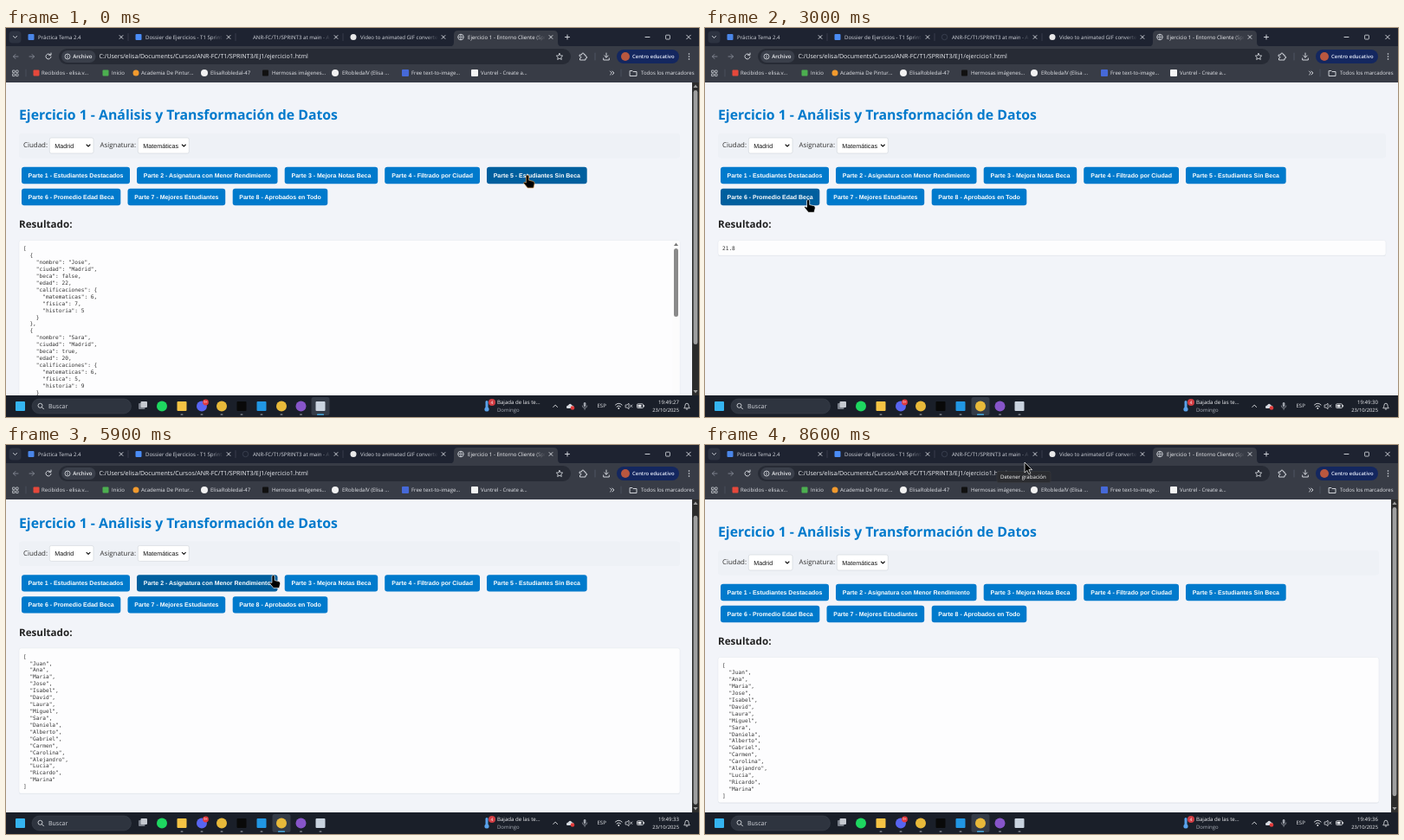
Write an HTML page that moves like this. It is 800 px wide and 450 px high and loops after 8.7 s.

```html
<!DOCTYPE html>
<html lang="es">
<head>
<meta charset="utf-8">
<title>Ejercicio 1</title>
<style>
html, body { margin: 0; width: 100%; height: 100%; overflow: hidden; background: #f2f4f9; }
svg { display: block; width: 100vw; height: 100vh; }
text { font-family: "Open Sans", "Noto Sans", sans-serif; text-rendering: geometricPrecision; white-space: pre; }
.ui { font-family: "Liberation Sans", Arial, sans-serif; }
.code { font-family: "DejaVu Sans Mono", monospace; }
.line { fill: none; stroke-linecap: round; stroke-linejoin: round; }
</style>
</head>
<body>
<svg viewBox="0 0 800 450" preserveAspectRatio="none">
  <defs>
    <clipPath id="view"><rect y="63" width="800" height="362"/></clipPath>
    <linearGradient id="fade"><stop offset="0" stop-color="#1e2331" stop-opacity="0"/><stop offset=".6" stop-color="#1e2331"/></linearGradient>
    <linearGradient id="fadeActive"><stop offset="0" stop-color="#383c46" stop-opacity="0"/><stop offset=".6" stop-color="#383c46"/></linearGradient>
  </defs>
  <rect width="800" height="450" fill="#f2f4f9"/>
  <g clip-path="url(#view)">
    <g id="page"></g>
    <g id="pageBar"></g>
  </g>
  <g id="browser"></g>
  <g id="taskbar"></g>
  <g id="tooltip"></g>
  <path id="cursor" fill="#000" stroke-width=".7" stroke-linejoin="round"/>
</svg>
<script>
const LOOP = 8700, STEP = 100, TOP = 63, VIEW = 362;
const $ = id => document.getElementById(id);

const rect = (x, y, w, h, fill, rx = 0, more = '') =>
  `<rect x="${x}" y="${y}" width="${w}" height="${h}" rx="${rx}" fill="${fill}" ${more}/>`;
const dot = (x, y, r, fill) => `<circle cx="${x}" cy="${y}" r="${r}" fill="${fill}"/>`;
const ring = (x, y, r, color) => `<circle cx="${x}" cy="${y}" r="${r}" fill="none" stroke="${color}" stroke-width=".8"/>`;
const line = (d, color = '#dfe2e8', width = .9) => `<path class="line" d="${d}" stroke="${color}" stroke-width="${width}"/>`;
// y is the middle of the line of text
const text = (x, y, str, size, fill, more = '') =>
  `<text x="${x}" y="${y + size * .36}" font-size="${size}" fill="${fill}" xml:space="preserve" ${more}>${str}</text>`;
const bold = 'font-weight="700"';
const square = (x, y, size, fill, rx = 1) => rect(x - size / 2, y - size / 2, size, size, fill, rx);

// Page data
const student = (nombre, ciudad, beca, edad, notas, promedio) => {
  const [matematicas, fisica, historia] = notas;
  return { nombre, ciudad, beca, edad, calificaciones: { matematicas, fisica, historia }, promedio };
};
const filtered = [
  student('Jose', 'Madrid', false, 22, [6, 7, 5]),
  student('Sara', 'Madrid', true, 20, [6, 5, 9]),
  student('Roberto', 'Madrid', false, 20, [7, 6, 8])
];
const best = [
  student('Carmen', 'Barcelona', true, 24, [9, 9, 9], 9),
  student('Alejandro', 'Bilbao', false, 23, [9, 8, 8], 8.333333333333334)
];
const passed = ('Juan Ana Maria Jose Isabel David Laura Miguel Sara Daniela Alberto Gabriel Carmen ' +
  'Carolina Alejandro Lucia Ricardo Marina').split(' ');
const noGrant = ['Juan (21 años)', 'Pedro (23 años)', 'Jose (22 años)', 'Roberto (20 años)'];

const views = [
  { at: 0, data: filtered, max: 219.5 },
  { at: 1200, data: 4, info: true },
  { at: 2400, data: 21.8 },
  { at: 3800, data: best },
  { at: 5700, data: passed }
].map(v => {
  const lines = JSON.stringify(v.data, null, 2).split('\n');
  const height = Math.min(v.max || 999, lines.length * 7.93 + 10);
  const total = 245.5 + height + 21.5 - TOP;
  return { ...v, lines, height, total, scrolls: total > VIEW };
});

const buttons = [
  [18, 161, 125, 'Parte 1 - Estudiantes Destacados'],
  [151, 161, 162.5, 'Parte 2 - Asignatura con Menor Rendimiento'],
  [321.7, 161, 107.5, 'Parte 3 - Mejora Notas Beca'],
  [437.2, 161, 109.8, 'Parte 4 - Filtrado por Ciudad'],
  [555, 161, 115.7, 'Parte 5 - Estudiantes Sin Beca'],
  [18, 186, 114.3, 'Parte 6 - Promedio Edad Beca'],
  [140.5, 186, 112.7, 'Parte 7 - Mejores Estudiantes'],
  [261.7, 186, 109.6, 'Parte 8 - Aprobados en Todo']
];
const inside = ([bx, by, w], x, y, pad = 0) =>
  x >= bx - pad && x <= bx + w + pad && y >= by - pad && y <= by + 19 + pad;

const select = (x, w, label) =>
  rect(x, 127, w, 18, '#fff', 2, 'stroke="#cfd3d8" stroke-width=".6"') +
  text(x + 6, 136, label, 7.2, '#111', 'class="ui"') +
  line(`M${x + w - 8} 135l2 2 2-2`, '#111', 1.1);

function result(v, right) {
  let out = rect(15, 246, right - 15, v.height, '#dfe4ea', 2.5) +
    rect(15, 245.5, right - 15, v.height - .3, '#fdfdfe', 2.5, 'stroke="#e3e7ec" stroke-width=".5"');
  v.lines.forEach((s, i) => out += text(20, 255 + i * 7.93, s, 6.16, '#333', 'class="code"'));
  if (v.max) out += rect(769.5, 246, 8, v.height - 1, '#fcfcfc') +
    rect(771, 255, 5, 79, '#8a8a8a', 2.5) + '<path d="M771 252l2.5-3.5 2.5 3.5z" fill="#777"/>';
  if (v.info) {
    out += rect(15, 275, right - 15, 95, '#007acc', 2.5) + rect(17, 275, right - 17, 95, '#eaf1fe', 2) +
      text(22, 296, 'Estudiantes sin beca en Madrid (4):', 9.24, '#222', bold);
    noGrant.forEach((s, i) => out += dot(35.5, 318.3 + i * 11.3, 1.3, '#333') + text(43, 318 + i * 11.3, s, 7.9, '#333'));
  }
  return out;
}

function page(v, x, y) {
  const right = v.scrolls ? 778 : 786;
  return text(15, 100.6, 'Ejercicio 1 - Análisis y Transformación de Datos', 15.82, '#007acc', bold) +
    rect(15, 122, right - 15, 28.5, '#eef1f6', 3) +
    text(20, 135.5, 'Ciudad:', 7.9, '#333') + text(108.5, 135.5, 'Asignatura:', 7.9, '#333') +
    select(50.3, 50.7, 'Madrid') + select(152.3, 59, 'Matemáticas') +
    buttons.map(b => rect(b[0], b[1] - .2, b[2], 19.4, inside(b, x, y) ? '#005f9e' : '#007acc', 3) +
      text(b[0] + b[2] / 2, b[1] + 9.2, b[3], 6.97, '#fff', `class="ui" text-anchor="middle" ${bold}`)).join('') +
    text(15, 227, 'Resultado:', 11.64, '#222', bold) + result(v, right);
}

function pageBar(v, scroll) {
  if (!v.scrolls) return '';
  const scale = 344 / v.total;
  return rect(792, TOP, 8, VIEW, '#2c2c2c') + rect(793.6, 72 + scroll * scale, 4.8, VIEW * scale, '#9f9f9f', 2.4) +
    '<path d="M793.4 69l2.6-3.6 2.6 3.6zM793.4 419l2.6 3.6 2.6-3.6z" fill="#9f9f9f"/>';
}

// Browser frame
const cross = (x, y, r) => line(`M${x - r} ${y - r}l${2 * r} ${2 * r}M${x + r} ${y - r}l${-2 * r} ${2 * r}`);
const tabs = ['Práctica Tema 2.4', 'Dossier de Ejercicios - T1 Sprint', 'ANR-FC/T1/SPRINT3 at main - A',
  'Video to animated GIF converter', 'Ejercicio 1 - Entorno Cliente (Spr'];
const tabIcons = [square(29, 10.5, 7, '#4a86e8'), square(153, 10.5, 7, '#4a8cf5'), '',
  dot(401, 10.5, 3.5, '#e8e8e8'), ring(525, 10.5, 3.3, '#dfe2e8') + line('M522 10.5h6M525 7.5q-2.5 3 0 6M525 7.5q2.5 3 0 6', '#dfe2e8', .5)];
const bookmarks = [
  [41, 'Recibidos - elisa.v...', square(35, 52, 7, '#e5483b')],
  [122, 'Inicio', square(115, 52, 7, '#4caf50')],
  [156, 'Academia De Pintur...', dot(150, 52, 3.5, '#f29a2e')],
  [236, 'ElisaRobledal-47', dot(229, 52, 4, '#f2f2f2')],
  [307, 'Hermosas imágenes...', square(299.5, 52, 7, '#111')],
  [388, 'ERobledalV (Elisa ...', dot(380, 52, 4, '#f2f2f2')],
  [468, 'Free text-to-image...', square(461, 52, 8, '#4669d8')],
  [548, 'Vuntrel - Create a...', square(541, 52, 8, '#f4f4f4')]
];

function browser() {
  let out = rect(0, 0, 800, 22, '#1e2331') + rect(0, 21, 800, 42, '#383c46') +
    rect(3.5, 3.5, 14, 14, '#2d3341', 4) + line('M8.5 9.5l2 2 2-2') +
    '<path d="M512 21.5q5 0 5-5V8q0-5 5-5h110q5 0 5 5v8.5q0 5 5 5z" fill="#383c46"/>';
  tabs.forEach((s, i) => {
    const x = 37 + i * 124, active = i === 4;
    out += tabIcons[i] + text(x, 10.5, s, 6.1, active ? '#f2f3f5' : '#d5d8df') +
      rect(x + 76, 5, 23, 12, `url(#fade${active ? 'Active' : ''})`) + cross(x + 96, 10.5, 1.9);
    if (i < 3) out += line(`M${x + 104} 6.5v8`, '#4a5060', .6);
  });
  out += line('M645.5 10.5h5M648 8v5M738 10.5h5') + rect(761.6, 8.2, 4.8, 4.8, 'none', .7, 'stroke="#dfe2e8" stroke-width=".8"') + cross(788, 10.5, 2.3) +
    line('M14 33H8.5m2.4-2.5L8.5 33l2.4 2.5M27 33h5.5m-2.4-2.5l2.4 2.5-2.4 2.5', '#858a95') +
    line('M51.3 31a3 3 0 1 0 .7 2.3M52 29v2.3h-2.3') +
    rect(61, 24, 591, 18, '#272b35', 9) + rect(64, 26, 39.5, 14, '#3a3f4a', 7) +
    ring(71, 33, 3, '#dfe2e8') + line('M71 32.7v1.7M71 31.2v.1', '#dfe2e8', .8) +
    text(77.3, 33, 'Archivo', 6.1, '#f0f1f4', 'font-weight="600"') +
    text(107.5, 32.8, 'C:/Users/elisa/Documents/Cursos/ANR-FC/T1/SPRINT3/EJ1/ejercicio1.html', 7.04, '#eef0f4') +
    line('M639 29.4l1.1 2.4 2.6.3-1.9 1.8.5 2.6-2.3-1.3-2.3 1.3.5-2.6-1.9-1.8 2.6-.3z', '#dfe2e8', .8) +
    line('M662.5 31h2q0-2 1.5-2t1.5 2h1.5v1.8q1.8 0 1.8 1.2t-1.8 1.2v1.8h-6.5v-2q1.5-.2 1.5-1.2t-1.5-1z') +
    line('M680 29v8', '#5a6070', .7) + line('M693 29v5m-2.2-2l2.2 2.2 2.2-2.2M689.7 35v2h6.6v-2') +
    rect(705, 25, 72, 16, '#14275f', 8) + dot(715, 33, 5, '#b9573f') + text(723, 33, 'Centro educativo', 5.9, '#e8eefc', 'font-weight="600"') +
    dot(788.5, 30, .8, '#dfe2e8') + dot(788.5, 33, .8, '#dfe2e8') + dot(788.5, 36, .8, '#dfe2e8');
  for (const x of [7.5, 11.5]) for (const y of [49, 53]) out += rect(x, y, 2.6, 2.6, 'none', .3, 'stroke="#dfe2e8" stroke-width=".7"');
  bookmarks.forEach(([x, s, icon]) => out += icon + text(x, 52, s, 6.05, '#e3e5ea'));
  return out + line('M23 48v8M710 48v8', '#565c69', .6) + line('M697.5 50l2 2-2 2M700 50l2 2-2 2') +
    line('M720.5 49.5h2.5l1 1h4v5h-7.5z') + text(733, 52, 'Todos los marcadores', 6.05, '#e3e5ea');
}

// Taskbar
const apps = [[180, '#1ed760', 1], [203, '#f5c344', 0], [226, '#5865f2', 1], [249, '#e8b93a', 1], [272, '#090909', 0],
  [295, '#2196e3', 0], [318, '#e8b93a', 1], [340.5, '#8755c9', 1], [363, '#c9d3df', 0]];

function taskbar(active, clock) {
  const pale = '#e8eaee';
  let out = rect(0, 425, 800, 25, '#1a1f29') + square(16.5, 437.5, 11, '#35b4f0', 1) +
    rect(30, 429, 114.5, 17, '#2e343f', 8.5, 'stroke="#414753" stroke-width=".5"') + ring(39.5, 436.8, 2.5, pale) + line('M41.5 438.8l2 2', pale) +
    text(49, 437.5, 'Buscar', 7, '#d6d9df') + rect(153, 434, 7.5, 7, '#777d87', 1) + rect(155.5, 432, 7.5, 7, '#c5c9d0', 1) +
    rect(active - 10.5, 427, 21, 21, '#343b47', 2.5);
  apps.forEach(([x, color, round], i) => {
    out += round ? dot(x, 437.5, 6, color) : square(x, 437.5, 11, color);
    if (i) out += x === active ? rect(x - 4, 446.5, 8, 1.3, '#4cc2ff', .6) : rect(x - 1.5, 446.5, 3, 1.2, '#8d929b', .6);
  });
  return out + dot(230.5, 433, 3.4, '#e0393e') + text(230.5, 433, '9+', 4, '#fff', 'text-anchor="middle"') +
    rect(553.5, 431, 3, 9, '#5aa2ea', 1.5) + dot(555, 441, 2.6, '#5aa2ea') +
    dot(561, 433, 4, '#d13b42') + text(561, 433, '4', 5, '#fff', 'text-anchor="middle"') +
    text(567, 433.3, 'Bajada de las te...', 6.1, '#f0f1f4') + text(567, 441.5, 'Domingo', 6, '#a9aeb7') +
    line('M631.8 438.5l2.4-2.4 2.4 2.4', pale) +
    '<path d="M647.5 440q-1.5-3 1.5-3.5 2-3.5 4.5 0 3 .5 1.5 3.5z" fill="#d7dbe1"/>' + dot(654, 439.5, 2.3, '#df3b3b') +
    rect(666.8, 433, 2.6, 5.2, '#9ea3ab', 1.3) + line('M665.3 437q0 2.6 2.8 2.6t2.8-2.6M668.1 439.6v2', '#9ea3ab', .7) +
    text(682.5, 437.3, 'ESP', 6, pale) +
    line('M703.5 436q3.8-3.6 7.6 0M705 438q2.3-2.2 4.6 0', pale) + dot(707.3, 440, .9, pale) +
    line('M715.5 436h1.5l2-1.8v6.6l-2-1.8h-1.5zM720.5 436l2.4 2.6m0-2.6l-2.4 2.6', pale, .7) +
    rect(728.5, 434.8, 7, 4.8, 'none', 1, `stroke="${pale}" stroke-width=".8"`) + rect(729.5, 435.8, 4, 2.8, pale) + line('M736.6 436.5v1.5', pale) +
    text(777, 433.3, clock, 6.05, '#f0f1f4', 'text-anchor="end"') + text(777, 441.5, '23/10/2025', 5.8, '#f0f1f4', 'text-anchor="end"') +
    line('M783 439.5q1-1 1-3 0-2.3 2-2.3t2 2.3q0 2 1 3zM785.3 441h1.4', pale, .8);
}

// Motion: [time, ...values], eased between points
const pointer = [[0, 602, 170], [1250, 602, 170], [2000, 90, 205.8], [2200, 87, 197], [2800, 87, 197], [3400, 211, 202],
  [4000, 211, 202], [4500, 225, 288], [5000, 225, 288], [5500, 315, 139], [5800, 315, 139], [6400, 228, 293],
  [7300, 228, 293], [8300, 369, 20], [LOOP, 369, 20]];
const scrolling = [[0, 0], [4350, 0], [4700, 58], [6800, 58], [7100, 0], [LOOP, 0]];
const ticks = [800, 1800, 2800, 3800, 4800, 5800, 6800, 7600, 8400];
const HAND = 'M-1.6 1.2q1.6-2.2 3.2 0v5l4.8 1.1q2 .6 1.7 2.6l-1.2 5.1h-6.7l-4.6-5.6q0-2 2.8-.4z';
const ARROW = 'M0 0v12l2.8-2.6 2 4.2 2-.9-1.9-4.1h3.7z';

function along(keys, t) {
  const i = Math.max(1, keys.findIndex(k => k[0] >= t));
  const [a, b] = [keys[i - 1], keys[i]];
  const p = (t - a[0]) / (b[0] - a[0]), e = p * p * (3 - 2 * p);
  return a.slice(1).map((n, j) => n + (b[j + 1] - n) * e);
}

function draw(t) {
  const v = views.filter(s => s.at <= t).pop();
  const [x, y] = along(pointer, t);
  const scroll = Math.min(along(scrolling, t)[0], Math.max(0, v.total - VIEW));
  const pageY = y + scroll;
  $('page').setAttribute('transform', `translate(0 ${-scroll})`);
  $('page').innerHTML = page(v, x, pageY);
  $('pageBar').innerHTML = pageBar(v, scroll);
  $('spinner').setAttribute('opacity', t < 1200 ? 0 : 1);
  const clock = '19:49:' + (27 + ticks.filter(s => s <= t).length);
  $('taskbar').innerHTML = taskbar(t < 1200 ? 363 : 318, clock);
  $('tooltip').innerHTML = t < 8400 ? '' :
    rect(337, 30.5, 62, 13, '#2b2c30', 2, 'stroke="#3d3e43" stroke-width=".5"') + text(341, 37, 'Detener grabación', 6.1, '#fff');
  const hand = y > TOP && buttons.some(b => inside(b, x, pageY, 3));
  $('cursor').setAttribute('d', hand ? HAND : ARROW);
  $('cursor').setAttribute('stroke', t < 1200 ? '#e0a35c' : '#fff');
  $('cursor').setAttribute('transform', `translate(${x} ${y})`);
}

$('browser').innerHTML = browser() + `<g id="spinner">${ring(276.5, 10.5, 3.2, '#3f4656')}</g>`;
const start = performance.now();
let last = -1;
function frame() {
  const t = Math.floor((performance.now() - start) % LOOP / STEP) * STEP;
  if (t !== last) draw(last = t);
  requestAnimationFrame(frame);
}
frame();
</script>
</body>
</html>
```
